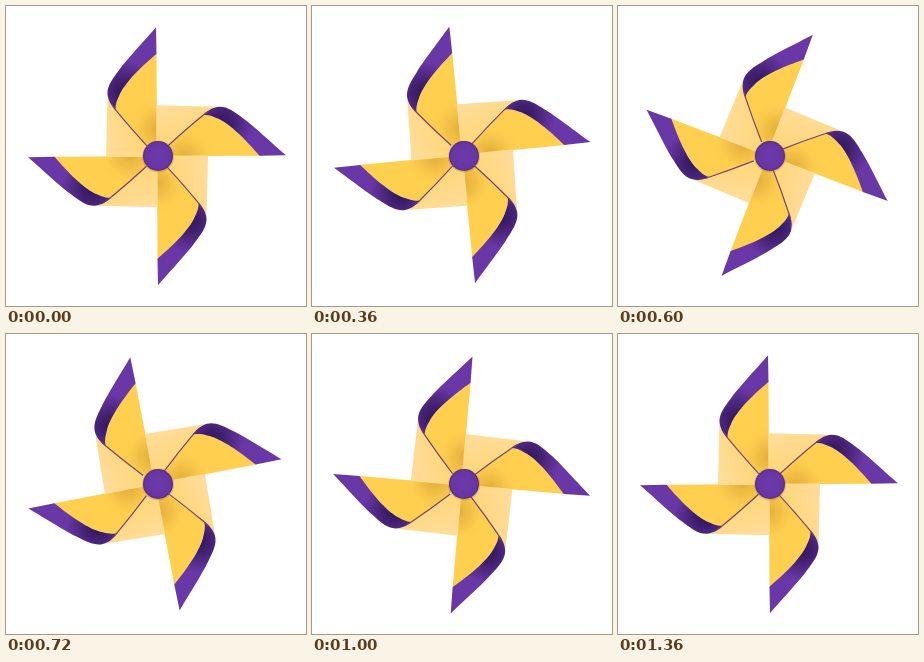
These frames come from a looping animation (300x300 px, 1.4 s). An HTML page:

```html
<!DOCTYPE html>
<html lang="en">
<head>
<meta charset="utf-8">
<title>Pinwheel</title>
<style>
  html, body { margin: 0; width: 100%; height: 100%; overflow: hidden; background: #fff; }
  svg { display: block; width: 100vw; height: 100vh; }
</style>
</head>
<body>
<svg viewBox="0 0 300 300" xmlns="http://www.w3.org/2000/svg">
  <defs>
    <radialGradient id="shade" gradientUnits="userSpaceOnUse" cx="2" cy="-27" r="32">
      <stop offset="0" stop-color="#dda636" stop-opacity=".9"/>
      <stop offset=".45" stop-color="#eab640" stop-opacity=".6"/>
      <stop offset="1" stop-color="#ffd050" stop-opacity="0"/>
    </radialGradient>
    <linearGradient id="pale" gradientUnits="userSpaceOnUse" x1="-51" y1="-20" x2="-16" y2="-30">
      <stop offset="0" stop-color="#ffdc98"/>
      <stop offset="1" stop-color="#ffd678"/>
    </linearGradient>
    <radialGradient id="fold" gradientUnits="userSpaceOnUse" cx="-33" cy="-65" r="31">
      <stop offset="0" stop-color="#32165a"/>
      <stop offset=".35" stop-color="#41206f"/>
      <stop offset="1" stop-color="#6a37a6"/>
    </radialGradient>
    <radialGradient id="knob">
      <stop offset="0" stop-color="#6d3aab"/>
      <stop offset=".85" stop-color="#6836a3"/>
      <stop offset="1" stop-color="#552a88"/>
    </radialGradient>

    <path id="sail" d="M-.5-104C-15-90-33-73-38-60C-41-54-42-49-41-46L0 0Z"/>
    <g id="back">
      <use href="#sail" fill="#ffd050"/>
      <use href="#sail" fill="url(#shade)"/>
    </g>
    <g id="front">
      <path fill="url(#pale)" d="M0 .7L-51 .7L-49.500-62C-48.500-54-45-50-41-46Z"/>
      <path fill="url(#fold)" d="M-1-129C-13-115-31-96-38-86C-45-77-50-70-49.500-62C-48.500-54-45-50-41-46C-42-49-41-54-38-60C-33-73-15-90-.5-102.500Z"/>
      <path fill="none" stroke="#74426f" stroke-width="1.200" d="M-45-51.500Q-43-48-41-46Q-27-29-10-10.500"/>
    </g>
  </defs>
  <g id="wheel"></g>
  <circle cx="152" cy="150.500" r="16" fill="#8a5a30" opacity=".25"/>
  <circle cx="152" cy="150" r="15" fill="url(#knob)"/>
</svg>
<script>
  const LOOP = 1400, STEP = 40, TURN_STEPS = 34;
  const wheel = document.getElementById('wheel');

  // Four equal blades: all sails lie below all folded corners.
  wheel.innerHTML = ['back', 'front'].map(part =>
    [0, 90, 180, 270].map(a => `<use href="#${part}" transform="rotate(${a})"/>`).join('')
  ).join('');

  // One anticlockwise turn in even steps; the closing step repeats the first pose.
  // The blades sit slightly off the turning point, while the knob stays still.
  function render(ms) {
    const step = Math.floor((ms % LOOP) / STEP);
    const angle = -360 * step / TURN_STEPS;
    wheel.setAttribute('transform', `translate(150 150) rotate(${angle}) translate(1 .3)`);
  }

  function tick() {
    render(performance.now());
    requestAnimationFrame(tick);
  }
  tick();
</script>
</body>
</html>
```
